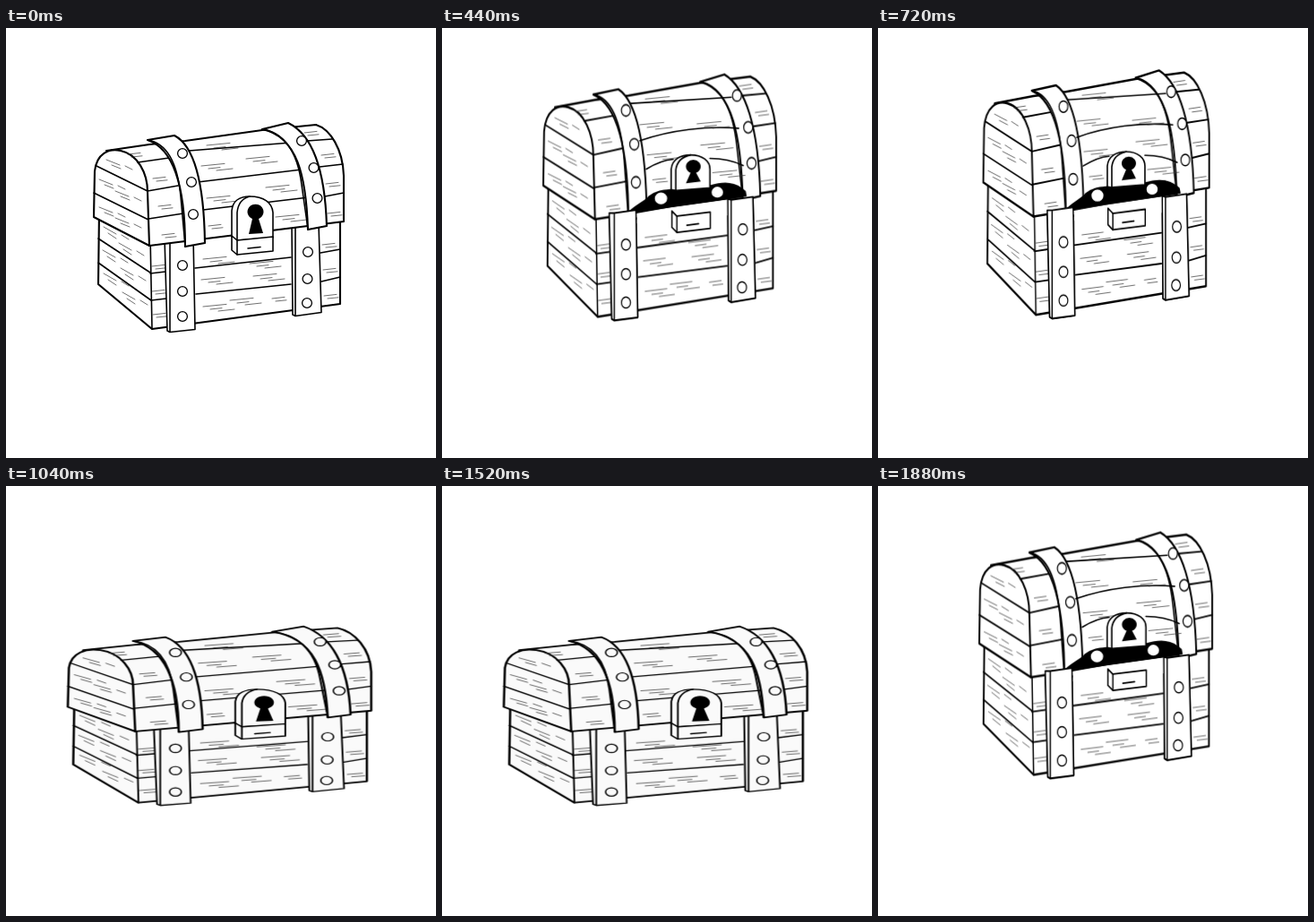
Animation, 480 px wide and 480 px high, one loop 1.92 s. Source, as an HTML page without scripts:

```html
<!DOCTYPE html>
<html lang="en">
<head>
<meta charset="utf-8">
<title>Treasure chest</title>
<style>
  html, body { margin: 0; width: 100%; height: 100%; overflow: hidden; background: #fff; }
  svg { display: block; width: 100%; height: 100%; }

  /* One bounce lasts 480 ms; every pose is a hard cut. */
  .chest, .lid, .open, .shut { animation: 480ms step-end -40ms infinite; }
  .chest { animation-name: bounce; stroke: #000; stroke-width: 1.6; stroke-linejoin: round; stroke-linecap: round; }
  .lid { animation-name: lift; }
  .open { animation-name: show; }
  .shut { animation-name: hide; }

  @keyframes bounce {
    0%     { transform: matrix(.932, 0, 0, 1.135, 21.7, -59); fill: #fff; }
    8.33%  { transform: matrix(1, 0, 0, 1, 0, 0); fill: #fff; }
    16.66% { transform: matrix(1.13, 0, 0, .91, -30, 41); fill: #fdfdfd; }
    24.99% { transform: matrix(1.214, 0, 0, .855, -50, 66.2); fill: #fafafa; }
    41.66% { transform: matrix(1.11, 0, 0, .925, -23.8, 33.9); fill: #fdfdfd; }
    49.99% { transform: matrix(.98, 0, 0, 1.04, 7, -17.6); fill: #fff; }
    58.33%, 100% { transform: matrix(.904, 0, 0, 1.145, 28.9, -64.5); fill: #fff; }
  }
  @keyframes lift {
    0%, 58.33%, 100% { transform: matrix(1, 0, 0, 1.04, 0, -12.6); }
    8.33% { transform: none; }
  }
  @keyframes show {
    0%, 58.33%, 100% { visibility: visible; }
    8.33% { visibility: hidden; }
  }
  @keyframes hide {
    0%, 58.33%, 100% { visibility: hidden; }
    8.33% { visibility: visible; }
  }

  .edge { stroke-width: 2.1; }
  .line { fill: none; }
  .grain { fill: none; stroke: #333; stroke-width: .7; }
  .ink { fill: #000; }
</style>
</head>
<body>
<svg viewBox="0 0 480 480">
  <defs>
    <circle id="rivet" r="5.4" stroke-width="1.3"/>
    <path id="gl" d="M0 0l26-2.6M8 3l13-1.4M17 5l18-2"/>
    <path id="gm" d="M0 0l14-1.6M4 3l12-1.2"/>
    <path id="gs" d="M0 0l14 8M5 7l9 6M20 9l8 5"/>
    <path id="ge" d="M0 0l15 6M6 6l10 4M21 7l8 4"/>
    <g id="straps">
      <path d="M177 234L180 338L183 339.5L211 336.500L209 231L183 234Z"/>
      <path class="line" d="M183 235V339"/>
      <path d="M319 220L320 320L323 321.500L352 317.500L349 218L323 221Z"/>
      <path class="line" d="M323 222V321"/>
      <use href="#rivet" x="197" y="265"/>
      <use href="#rivet" x="197" y="294"/>
      <use href="#rivet" x="197" y="322"/>
      <use href="#rivet" x="337" y="250"/>
      <use href="#rivet" x="336.500" y="280"/>
      <use href="#rivet" x="336" y="307"/>
    </g>
  </defs>

  <g class="chest">
    <g class="body">
      <path class="edge" d="M104 205L103 286L163 336L373 308V205L161 228Z"/>
      <path class="line" d="M161 230L163 336M103 235L161 273M103 262L162 304"/>
      <path class="line" d="M161 274L178 272M162 304L179 302M211 268L318 256M212 297L318 286M351 251L373 247M352 283L373 278"/>
      <g class="grain">
        <use href="#gs" x="109" y="222"/>
        <use href="#gs" x="126" y="240"/>
        <use href="#gs" x="108" y="248"/>
        <use href="#gs" x="128" y="268"/>
        <use href="#gs" x="109" y="274"/>
        <use href="#gs" x="130" y="295"/>
        <use href="#gm" x="163" y="266"/>
        <use href="#gm" x="163" y="294"/>
        <use href="#gm" x="164" y="320"/>
        <use href="#gl" x="220" y="258"/>
        <use href="#gl" x="272" y="263"/>
        <use href="#gl" x="218" y="281"/>
        <use href="#gl" x="276" y="277"/>
        <use href="#gl" x="220" y="311"/>
        <use href="#gl" x="250" y="304"/>
        <use href="#gm" x="297" y="302"/>
        <use href="#gm" x="353" y="242"/>
        <use href="#gm" x="354" y="270"/>
        <use href="#gm" x="355" y="299"/>
      </g>
      <use href="#straps"/>
    </g>

    <g class="lid">
      <path class="edge" d="M112 137L160 130L200 126L286 114L346 108C362 113 376 135 377 165V216L160 243Z"/>
      <path class="edge" d="M98 211L99 160C101 140 115 134 128 137C147 141 158 162 158 183L160 243Z"/>
      <path class="line" d="M101 154L158 182M98 184L159 214"/>
      <path class="line" d="M147 150L182 145M158 182L192 176M159 213L198 207M336 126L364 124M350 155L376 152M356 188L377 184"/>
      <g class="grain">
        <use href="#ge" x="112" y="147"/>
        <use href="#ge" x="104" y="169"/>
        <use href="#ge" x="122" y="182"/>
        <use href="#ge" x="104" y="200"/>
        <use href="#ge" x="122" y="212"/>
        <use href="#gm" x="136" y="141"/>
        <use href="#gm" x="164" y="168"/>
        <use href="#gm" x="170" y="199"/>
        <use href="#gm" x="174" y="231"/>
        <use href="#gm" x="333" y="117"/>
        <use href="#gm" x="352" y="142"/>
        <use href="#gm" x="357" y="174"/>
        <use href="#gm" x="359" y="207"/>
      </g>
      <g class="shut">
        <path class="line" d="M204 137L318 128M214 172L330 158M220 203L338 189"/>
        <g class="grain">
          <use href="#gl" x="224" y="131"/>
          <use href="#gl" x="218" y="154"/>
          <use href="#gl" x="268" y="146"/>
          <use href="#gl" x="224" y="190"/>
          <use href="#gl" x="290" y="178"/>
          <use href="#gm" x="226" y="221"/>
          <use href="#gl" x="301" y="211"/>
        </g>
      </g>
      <path class="edge" d="M158 125L188 120C209 131 221 170 222 240L200 244C200 180 188 135 158 125Z"/>
      <path class="line" d="M158 125C177 128 191 146 195 188L200 243"/>
      <path class="edge" d="M286 113L315 106C340 118 356 155 358 221L337 225C335 165 325 121 286 113Z"/>
      <path class="line" d="M286 113C308 116 325 135 330 175L337 224"/>
      <use href="#rivet" x="197" y="140"/>
      <use href="#rivet" x="207" y="172"/>
      <use href="#rivet" x="209" y="208"/>
      <use href="#rivet" x="330" y="126"/>
      <use href="#rivet" x="343.500" y="156"/>
      <use href="#rivet" x="347.500" y="190"/>
    </g>

    <!-- Raised front with the eyes, laid out in the stretched pose -->
    <g class="open" transform="translate(-31.970 56.330) scale(1.106 .873)">
      <path class="line" d="M212 80L321 73M222 122C255 110 295 105 329 108M229 154Q245 144 258 143M298 142Q318 142 334 150"/>
      <g class="grain">
        <use href="#gl" x="228" y="75"/>
        <use href="#gl" x="222" y="104"/>
        <use href="#gl" x="284" y="103"/>
        <use href="#gl" x="230" y="138"/>
        <use href="#gl" x="288" y="127"/>
        <use href="#gm" x="236" y="166"/>
        <use href="#gl" x="301" y="158"/>
      </g>
      <path class="ink" d="M208 205C215 196 229 190 232 185C241 178 249 178 258 177L298 173C314 168 326 169 336 179L337 184L300 190L219 203Z"/>
      <path stroke="none" d="M219 203L257 197L318 188V206L219 215Z"/>
      <path class="line" d="M219 203L257 196L318 187"/>
      <circle cx="245" cy="187" r="7.500"/>
      <circle cx="306" cy="180" r="7"/>
      <path d="M256 177V154C257 143 266 138 277 138C290 138 298 145 298 154V175L261 178Z"/>
      <path class="line" d="M261 178V155C262 146 268 140 277 138"/>
      <path class="ink" stroke="none" d="M277 158L272 170L288 168L283 158A8 7.500 0 1 0 277 158Z"/>
    </g>
    <use class="open" href="#straps"/>

    <g class="shut">
      <path d="M252 233V204C253 193 261 188 272 188C288 188 297 195 298 206V234L258 237Z"/>
      <path class="line" d="M258 237V206C259 196 264 190 272 188"/>
      <path class="ink" stroke="none" d="M275 213L271 230L287 229L282 213A9 8.500 0 1 0 275 213Z"/>
    </g>
    <path d="M252 232L258 237L298 233V249L258 253L252 248Z"/>
    <path class="line" d="M258 237V253M270 246L284 244.500"/>
  </g>
</svg>
</body>
</html>
```
